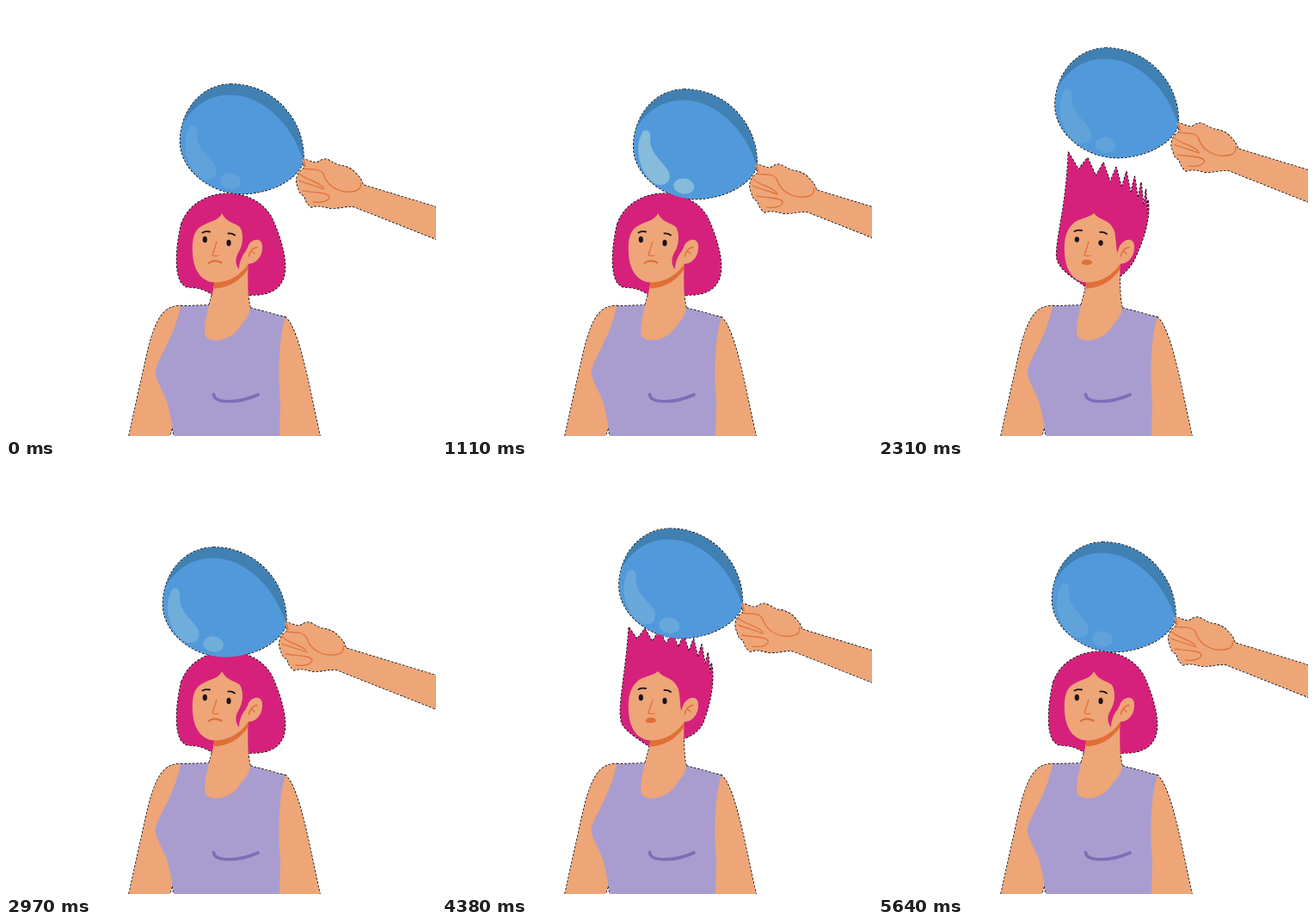
Write an HTML page with a canvas that moves like this. It is 500x500 px and loops after 5.7 s.

```html
<!DOCTYPE html>
<html lang="en">
<head>
<meta charset="utf-8">
<title>Balloon and static hair</title>
<style>
  html, body { margin: 0; width: 100%; height: 100%; overflow: hidden; background: #fff; }
  canvas { display: block; width: 500px; height: 500px; }
</style>
</head>
<body>
<canvas id="stage" width="500" height="500"></canvas>
<script>
const ctx = document.getElementById('stage').getContext('2d');
const LOOP = 5700, STEP = 30, LAST = 5640;
const SKIN = '#eea577', LINE = '#df6f37', HAIR = '#d5217c', INK = '#1c141c';

const clamp = v => Math.max(0, Math.min(1, v));
const mix = (a, b, k) => a + (b - a) * k;
const ramp = (t, start, length) => (1 - Math.cos(Math.PI * clamp((t - start) / length))) / 2;
const sum = (list, f) => list.reduce((total, v) => total + f(v), 0);

// The balloon comes down, rubs the hair, then lifts it
const rubs = [0, 2790, LAST], lifts = [1400, 4215], drops = [5420 - LAST, 2690, 5420];
const blinks = [2205, 4965];
const RUB = { first: 229, last: 1309, period: 540, middle: 2.3, reach: 26.5 };

function pose(t) {
  const rise = 1 + sum(lifts, s => ramp(t, s, 350)) - sum(drops, s => ramp(t, s, 286));
  const c = t - rubs.filter(s => t >= s - 80).pop();
  const phase = Math.max(RUB.first, Math.min(RUB.last, c)) - RUB.first;
  const swing = RUB.middle - RUB.reach * Math.cos(2 * Math.PI * phase / RUB.period);
  const surprise = clamp((rise - .435) / .02);
  return {
    x: mix(3.5, swing, ramp(c, -80, 350) - ramp(c, RUB.last, 190)),
    y: 6 - 48 * rise,
    glow: .27 + .73 * (ramp(c, 0, 380) - ramp(c, 1560, 45)),
    spiky: clamp((rise - .13) / .285) + .1 * surprise + .35 * clamp((rise - .45) / .55),
    surprise,
    open: Math.min(...blinks.map(b => clamp(Math.abs(t - b) / 120)))
  };
}

const P = d => new Path2D(d);
const body = {
  leftArm: P('M143 500L154 450C160 424 164 402 169 386C177 360 186 348 204 348.500L212 440L194 489L190 500Z'),
  rightArm: P('M315 361L325 362C333 369 339 388 344 406C351 432 358 468 365 500H310Z'),
  torso: P('M203 349L236 348L284 351L325 362C317 385 316 430 319 460L318 500H195C193 485 191 474 187 460C184 450 174 436 173.500 425C176 410 196 385 203 349Z'),
  neck: P('M242 300V322C241 333 238 341 236 348C232 365 229 381 233 385C240 392 259 389 269 377C277 366 283 361 284 351C281 340 281 322 281.500 295Z')
};
const chinShade = P('M242 321C258 322 273 313 281.500 300V306C272 320 258 328 242 328.500Z');
const crease = P('M241.500 451.500C242 462 268 463 293 452');
const balloon = P('M262 91C230 91 204 118 202.500 155C201 190 238 218.500 275 218.500C305 218 330 205 340 191C346 184 346.500 178 345.500 168C342 128 308 91 262 91Z');
const cap = P('M205 138C220 110 244 103 262 103.500C300 104 334 140 345.500 180L360 80H200Z');
const shine = P('M213 140C219 136 223 141 222 150C222 166 236 174 243 186C247 194 243 203 232 202C218 199 204 175 209 150Z');
const hand = P('M344 178C351 178 355 183 362 182C366 179 370 177.500 373 178.500C377 180 381 183 386 185C395 186 402 189 406 194C411 199 414 203 415 208L540 246V287L405 233.500C395 232 386 236 376 235C368 233 362 231 355 234C350 230 348 226 347 221C343 219 340 216 340 211C337 207 337 200 340 195C342 191 345 190 347 188Z');
const handLines = P('M345 189C355 191 364 188 369 195C372 207 382 214 394 216C406 217 414 214 412 206M340 194C346 202 362 203 369 211M341 203C350 207 363 210 370 213M345 215C355 217 374 216 376 222C375 228 365 229 357 228M346 179L348 187');

// k = 0: smooth dome, 1: spikes; above 1 they stretch further
function hairPath(k) {
  const path = new Path2D(), n = 16;
  const curve = (smooth, spiky) =>
    path.bezierCurveTo(...smooth.map((v, i) => mix(v, spiky[i], k)));
  for (let i = 0; i <= n; i++) {
    const u = i / n, a = mix(165, 19, u) * Math.PI / 180;
    const x = 216 + 97 * (1 - (1 - u) ** 1.5);
    const y = 196 + 37 * u ** 3 + (i % 2) * (11 + 8 * u);
    path.lineTo(mix(258 + 56 * Math.cos(a), x, k), mix(266 - 48 * Math.sin(a), y, k));
  }
  curve([320, 272, 329, 300, 322, 318], [319, 260, 309, 293, 305, 303]);
  curve([314, 336, 295, 336, 281, 336], [299, 314, 290, 318, 281, 321]);
  path.lineTo(241, mix(336, 329, k));
  curve([232, 330, 224, 327, 212, 327], [228, 320, 215, 313, 209, 303]);
  curve([194, 324, 197, 282, 204, 253], [203, 285, 212, 250, 216, 196]);
  path.closePath();
  return path;
}

function facePath(surprise) {
  const up = 4 * surprise;
  return P(`M251 241C248 ${249 - up} 238 ${250 - up} 229 ${255 - up}
    C218 260 216 272 217 288C218 308 228 321 243 321.5C258 321 274 312 281 300
    C291 300 298 291 298 281C299 270 288 268 281 279L278 287
    C276 275 277 263 273 258C268 ${252 - up} 257 ${253 - up} 251 241Z`);
}

// The lock beside the ear shrinks towards its root
function lockPath(shrink) {
  const m = (x, y) => `${mix(x, 278, shrink)} ${mix(y, 283, shrink)} `;
  return P(`M271 255C277 264 ${m(276, 278)}${m(270, 287)}C${m(266, 294)}${m(267, 302)}${m(271, 306)}
    C${m(271, 297)}${m(275, 290)}281 281L285 268Z`);
}

function fill(path, color) {
  ctx.fillStyle = color;
  ctx.fill(path);
}

function stroke(path, color, width) {
  ctx.strokeStyle = color;
  ctx.lineWidth = width;
  ctx.stroke(path);
}

function ellipse(x, y, rx, ry, color, turn = 0) {
  ctx.fillStyle = color;
  ctx.beginPath();
  ctx.ellipse(x, y, rx, ry, turn, 0, 7);
  ctx.fill();
}

function shifted(x, y, draw) {
  ctx.save();
  ctx.translate(x, y);
  draw();
  ctx.restore();
}

function drawRim(paths) {
  ctx.lineCap = 'butt';
  ctx.setLineDash([3, 1.5]);
  paths.forEach(p => stroke(p, '#000', 1.5));
  ctx.setLineDash([]);
  ctx.lineCap = 'round';
}

function drawBody() {
  fill(body.leftArm, SKIN);
  fill(body.rightArm, SKIN);
  fill(body.torso, '#a99dcf');
  fill(body.neck, SKIN);
  stroke(crease, '#7f6cb6', 3.6);
}

function drawFace({ spiky, surprise, open }) {
  fill(chinShade, LINE);
  fill(facePath(surprise), SKIN);
  if (surprise < 1) fill(lockPath(surprise), HAIR);
  stroke(P('M292 280.5C287 281 283 285 282.5 291M285.5 285L289 288'), LINE, 1.4);
  stroke(P('M245 274L240 289.5Q243 291.5 247 290'), LINE, 1.2);

  ellipse(231.3, 271.5, 2.6, Math.max(.7, 3.8 * open), INK);
  ellipse(259, 275.5, 2.6, Math.max(.7, 3.8 * open), INK);
  shifted(0, -1.5 * surprise, () =>
    stroke(P('M228.5 263.5Q232.5 261.5 237 262.5M258.500 264.5Q262.5 264 266 266.5'), INK, 1.9));

  if (surprise < .5) stroke(P('M235.5 299Q242 294 250.5 298.5'), LINE, mix(2, 2.8, spiky));
  else fill(P('M236.5 299C237 294 248 293 249 298.5C248 302 238 302 236.5 299Z'), LINE);
}

function drawBalloon(glow) {
  fill(balloon, '#5199da');
  ctx.save();
  ctx.clip(balloon);
  fill(cap, '#4180b2');
  ctx.restore();
  ctx.globalAlpha = glow;
  fill(shine, '#87bbdb');
  ellipse(261, 203.5, 12, 9, '#87bbdb', .15);
  ctx.globalAlpha = 1;
}

function draw(t) {
  const now = pose(t), hair = hairPath(now.spiky);
  ctx.clearRect(0, 0, 500, 500);
  ctx.lineCap = ctx.lineJoin = 'round';

  drawRim([...Object.values(body), hair]);
  shifted(now.x, now.y, () => drawRim([balloon, hand]));

  fill(hair, HAIR);
  drawBody();
  drawFace(now);
  shifted(now.x, now.y, () => {
    drawBalloon(now.glow);
    fill(hand, SKIN);
    stroke(handLines, LINE, 1.2);
  });
}

const start = performance.now();
function tick() {
  const t = Math.max(0, performance.now() - start) % LOOP;
  draw(Math.min(LAST, Math.floor(t / STEP) * STEP));
  requestAnimationFrame(tick);
}
tick();
</script>
</body>
</html>
```
